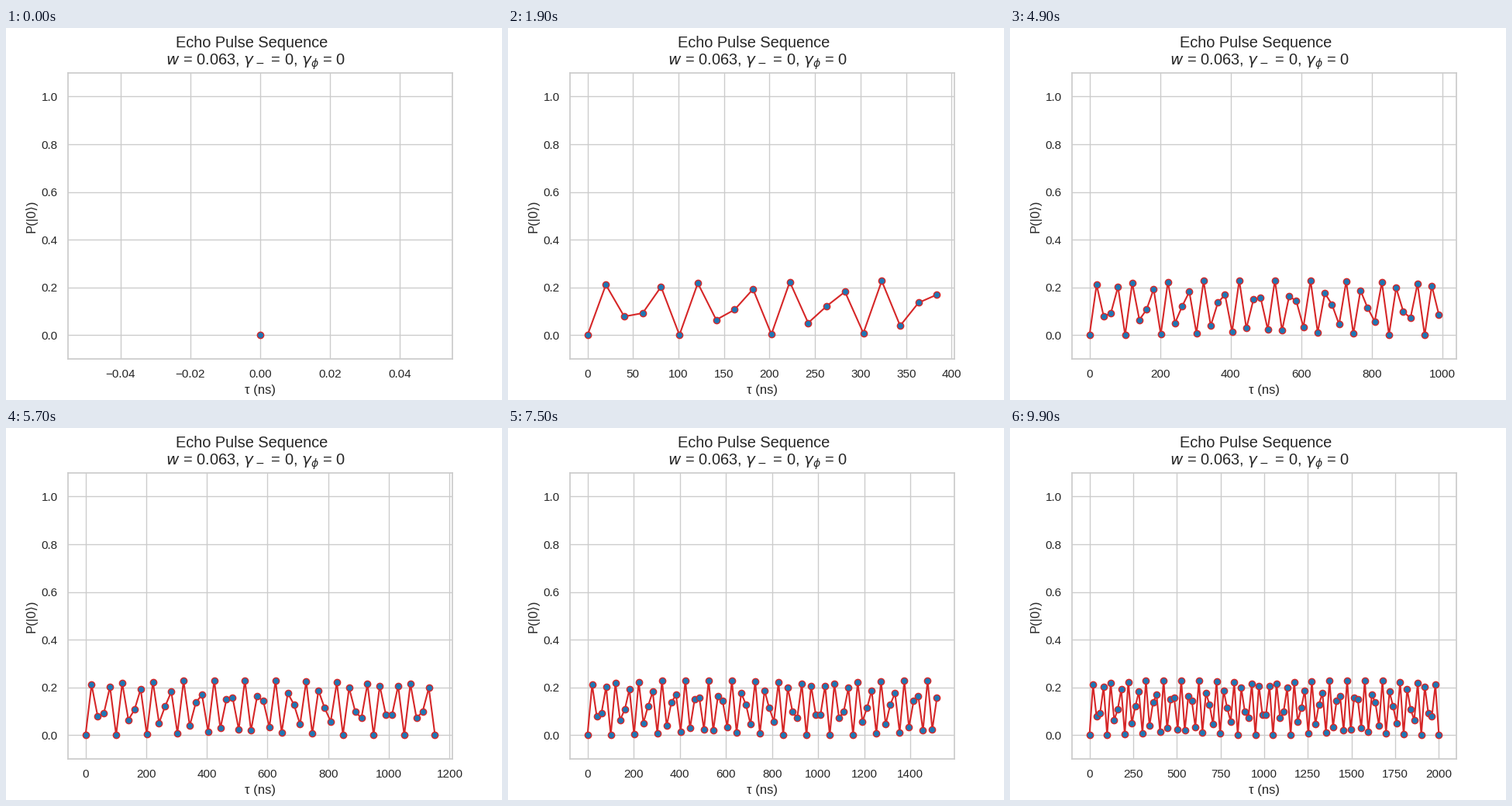
A matplotlib script for the animation above (10 s loop, 640 by 480 pixels).

```python
import numpy as np
import matplotlib.pyplot as plt
from matplotlib.animation import FuncAnimation

INK = "0.15"
GRID = "0.8"
plt.rcParams.update({
    "font.family": ["Liberation Sans", "DejaVu Sans"],
    "font.size": 12,
    "text.color": INK,
    "axes.labelcolor": INK,
    "axes.labelsize": 12,
    "axes.edgecolor": GRID,
    "axes.linewidth": 1.25,
    "axes.axisbelow": True,
    "axes.grid": True,
    "grid.color": GRID,
    "grid.linewidth": 1,
    "lines.solid_capstyle": "round",
    "xtick.color": INK,
    "ytick.color": INK,
    "xtick.labelsize": 11,
    "ytick.labelsize": 11,
    "xtick.major.size": 6,
    "ytick.major.size": 6,
    "xtick.bottom": False,
    "ytick.left": False,
})

STEPS = 100
W = 2 * np.pi / 100
tau = np.linspace(0, 2000, STEPS)
prob = np.sin(0.5 * np.sin(W * tau)) ** 2

fig, ax = plt.subplots(figsize=(6.4, 4.8), dpi=100)
fig.suptitle("Echo Pulse Sequence \n"
             rf" $w$ = {W:.3f}, $\gamma_-$ = 0, $\gamma_\phi$ = 0")
ax.set_xlabel("τ (ns)")
ax.set_ylabel("P(|0⟩)")
ax.set_ylim(-0.1, 1.1)
line, = ax.plot([], [], "o-", color="tab:red", markerfacecolor="tab:blue",
                lw=1.5, ms=6)


def update(i):
    """Reveal one more sample and refit the time axis."""
    line.set_data(tau[:i + 1], prob[:i + 1])
    ax.relim()
    ax.autoscale_view(scaley=False)
    return line,


anim = FuncAnimation(fig, update, frames=STEPS, interval=100,
                     repeat=True, repeat_delay=0)
plt.show()
```
